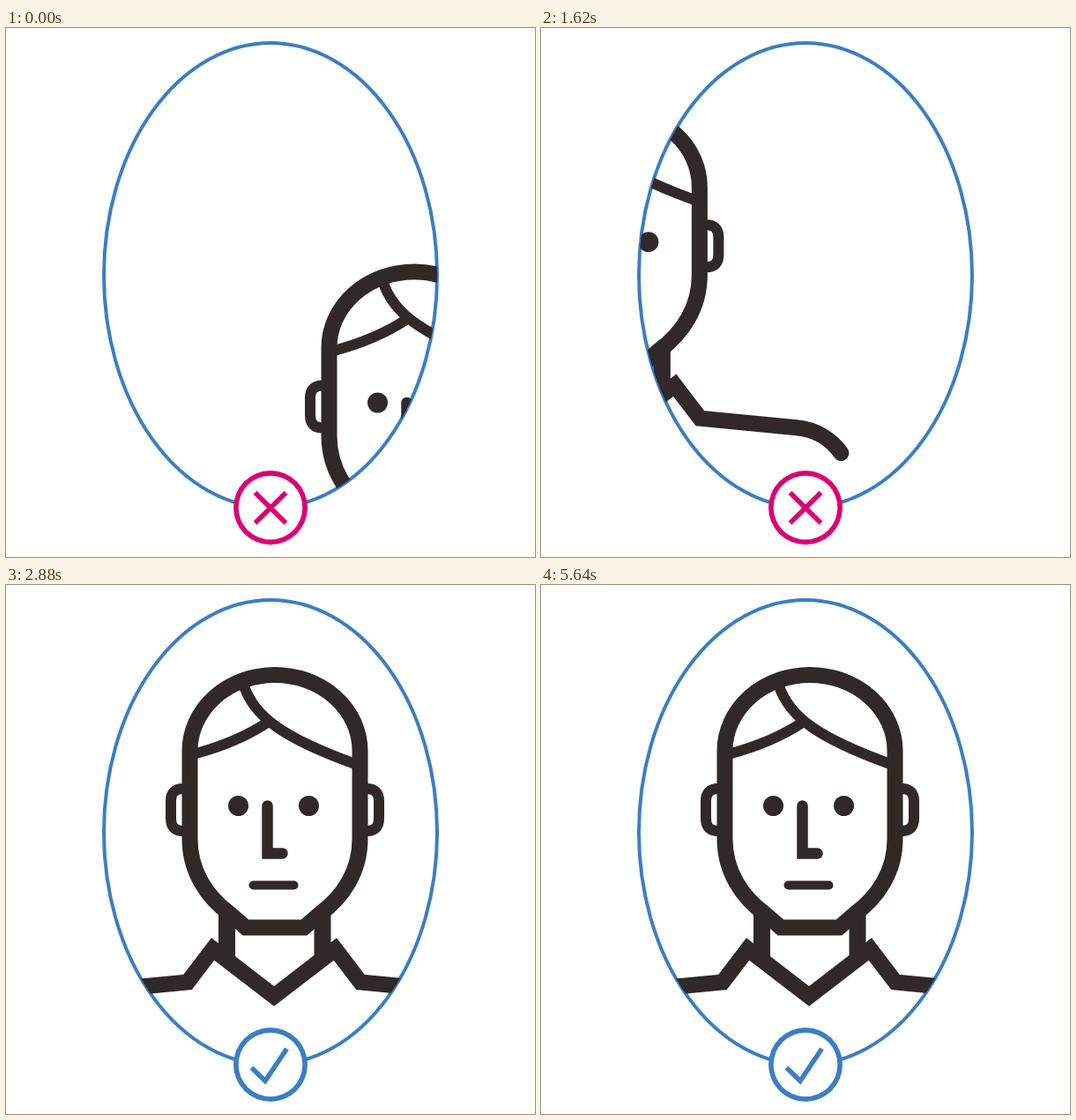
Write an HTML page with a canvas that moves like this. It is 600 px wide and 600 px high and loops after 6.72 s.

```html
<!DOCTYPE html>
<html lang="en">
<head>
<meta charset="utf-8">
<title>Face positioning</title>
<style>
  html, body { margin: 0; width: 100%; height: 100%; overflow: hidden; background: #fff; }
  canvas { display: block; width: 600px; height: 600px; }
</style>
</head>
<body>
<canvas id="stage" width="600" height="600"></canvas>
<script>
const ctx = document.getElementById("stage").getContext("2d");

const INK = "#302829", BLUE = "#3b7ec3", PINK = "#da0073";
const LOOP = 6720, STEP = 60;
const TURN = 1440, ARRIVE = 2880, DARK = 4320, CLEAR = 5640;
const SHADE = 0.69;

// Head offsets from the centred pose
const START = [158, 174.5], LEFT = [-222, 0.5], HOME = [0, 0];

const lerp = (a, b, k) => [a[0] + (b[0] - a[0]) * k, a[1] + (b[1] - a[1]) * k];
const smooth = k => k * k * (3 - 2 * k);

// Cubic curve walked at even speed: returns progress 0..1 -> point
function curve(p0, c0, c1, p1) {
  const n = 300, points = [], lengths = [0];
  for (let i = 0; i <= n; i++) {
    const t = i / n, u = 1 - t;
    points.push([0, 1].map(a =>
      u * u * u * p0[a] + 3 * u * u * t * c0[a] + 3 * u * t * t * c1[a] + t * t * t * p1[a]));
    if (i) {
      const [a, b] = [points[i - 1], points[i]];
      lengths.push(lengths[i - 1] + Math.hypot(b[0] - a[0], b[1] - a[1]));
    }
  }
  return k => {
    const goal = k * lengths[n];
    let i = 1;
    while (i < n && lengths[i] < goal) i++;
    return lerp(points[i - 1], points[i], (goal - lengths[i - 1]) / (lengths[i] - lengths[i - 1]));
  };
}

const handle = [(HOME[0] - START[0]) / 6, (HOME[1] - START[1]) / 6];
const sweepLeft = curve(START, lerp(START, LEFT, 1 / 6),
  [LEFT[0] - handle[0], LEFT[1] - handle[1]], LEFT);
const settle = curve(LEFT, [LEFT[0] + handle[0], LEFT[1] + handle[1]],
  lerp(HOME, LEFT, 1 / 6), HOME);

function headOffset(t) {
  if (t < TURN) return sweepLeft(smooth(t / TURN));
  if (t < ARRIVE) return settle(smooth((t - TURN) / (ARRIVE - TURN)));
  return HOME;
}

const oval = new Path2D();
oval.ellipse(300, 280.5, 189, 263.5, 0, 0, 2 * Math.PI);

const skull = new Path2D(
  "M272 388.5 L254 373 C228 354 208.5 325 208.5 288 V188" +
  "A96.5 86 0 0 1 401.5 188 V288 C401.5 325 382 354 356 373 L338 388.5 Z");
const hair = new Path2D("M212 192 Q262 179 298 155 M269.5 113 C281 150 316 174 396 203");
const ears = new Path2D(
  "M206 231 H201 Q187 231 187 245 V265 Q187 279 201 279 H206" +
  "M404 231 H409 Q423 231 423 245 V265 Q423 279 409 279 H404");
const nose = new Path2D("M296.5 250.5 V304.5 H313.5");
const mouth = new Path2D("M280.5 340.5 H326.5");
const neck = new Path2D("M250.5 370 V421 M359 370 V421");
const collar = new Path2D(
  "M46 490 C57 474 75 463 97 461 L206 450.5 L234.6 413 L304 466.5" +
  "L373.4 413 L402 450.5 L511 461 C533 463 551 474 562 490");

function line(path, width, color, cap = "butt") {
  ctx.lineWidth = width;
  ctx.strokeStyle = color;
  ctx.lineCap = cap;
  ctx.stroke(path);
}

function dot(x, y, r, color) {
  ctx.beginPath();
  ctx.arc(x, y, r, 0, 2 * Math.PI);
  ctx.fillStyle = color;
  ctx.fill();
}

function drawPerson([dx, dy]) {
  ctx.save();
  ctx.translate(dx, dy);
  line(ears, 12, INK);
  line(neck, 19, INK);
  line(collar, 18, INK, "round");
  line(hair, 12, INK);
  line(skull, 18, INK);
  line(nose, 12.5, INK, "round");
  line(mouth, 10, INK, "round");
  dot(263.5, 250.5, 11.5, INK);
  dot(343.5, 250.5, 11.5, INK);
  ctx.restore();
}

const cross = new Path2D("M282.5 527 L317.5 561.5 M317.5 527 L282.5 561.5");
const tick = new Path2D("M278.5 547.5 L294 562.5 L318.5 526");

function drawBadge(ok) {
  const color = ok ? BLUE : PINK;
  dot(300, 544, 42, color);
  dot(300, 544, 36.3, "#fff");
  line(ok ? tick : cross, 5.5, color);
}

function draw(t) {
  ctx.fillStyle = "#fff";
  ctx.fillRect(0, 0, 600, 600);
  line(oval, 4, BLUE);

  ctx.save();
  ctx.clip(oval);
  drawPerson(headOffset(t));
  ctx.restore();

  const dark = t >= DARK && t < CLEAR;
  if (dark) {
    ctx.globalAlpha = SHADE * (1 - smooth((t - DARK) / (CLEAR - DARK)));
    ctx.fillStyle = INK;
    ctx.fill(oval);
    ctx.globalAlpha = 1;
  }
  drawBadge(t >= ARRIVE && !dark);
}

const began = performance.now();
function tickFrame() {
  const t = (performance.now() - began) % LOOP;
  draw(Math.floor(t / STEP) * STEP);
  requestAnimationFrame(tickFrame);
}
tickFrame();
</script>
</body>
</html>
```
